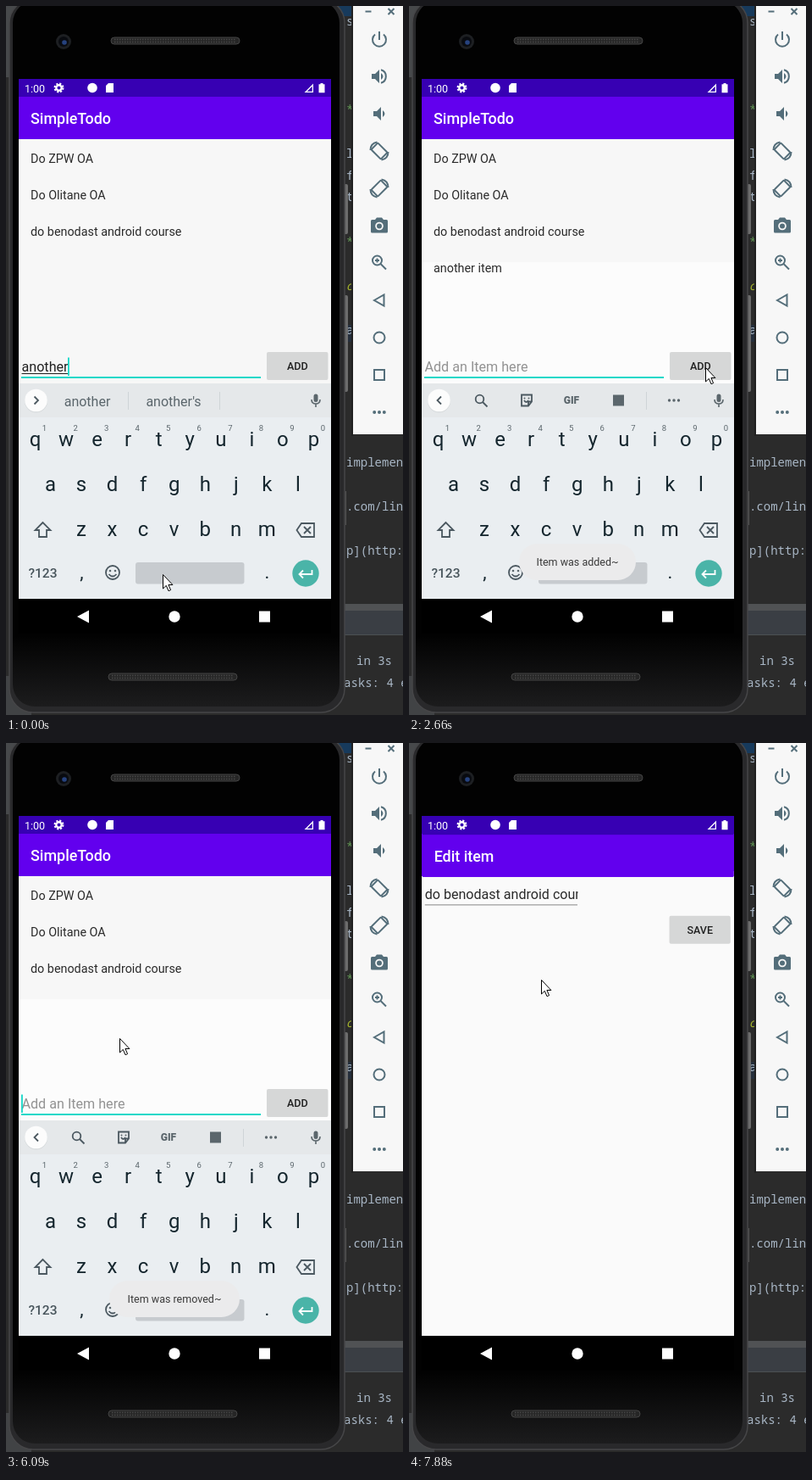
An HTML page for the animation above (8000 ms loop, 469 px wide and 836 px high).

```html
<!DOCTYPE html>
<html lang="en">
<head>
<meta charset="utf-8">
<title>Todo demo</title>
<style>
  html, body { margin: 0; width: 100%; height: 100%; overflow: hidden; background: #2b2b2b; }
  svg { display: block; width: 469px; height: 836px; font-family: Roboto, sans-serif; }
  .mono { font-family: "Noto Sans Mono", monospace; }
  .line { fill: none; stroke: #546e7a; stroke-width: 2; }
  .key { fill: none; stroke: #4b5860; stroke-width: 1.8; }
</style>
</head>
<body>
<script>
const LOOP = 8000;
const SLATE = '#546e7a', GREY = '#5b666c', TEAL = '#14d8c8';

const rect = (x, y, w, h, fill, more = '') => `<rect x="${x}" y="${y}" width="${w}" height="${h}" fill="${fill}" ${more}/>`;
const circle = (x, y, r, fill, more = '') => `<circle cx="${x}" cy="${y}" r="${r}" fill="${fill}" ${more}/>`;
const path = (d, fill, more = '') => `<path d="${d}" fill="${fill}" ${more}/>`;
const text = (x, y, s, size, fill, more = '') => `<text x="${x}" y="${y}" font-size="${size}" fill="${fill}" ${more}>${s}</text>`;
const mid = (x, y, s, size, fill, more = '') => text(x, y, s, size, fill, `text-anchor="middle" ${more}`);
const at = (x, y, body, more = '') => `<g transform="translate(${x} ${y}) ${more}">${body}</g>`;
const group = (id, body, more = '') => `<g id="${id}" ${more}>${body}</g>`;
const stroke = (d, cls = 'line') => `<path class="${cls}" d="${d}"/>`;
const dots = (x, y, gap, r, fill) => [-gap, 0, gap].map(dx => circle(x + dx, y, r, fill)).join('');

function editor() {
  const code = [[402, 23, 's'], [402, 179, 'l'], [402, 205, 'f'], [402, 230, 't'], [402, 387, 'a'],
    [402, 543, 'implemen'], [402, 595, '.com/lin'], [402, 647, 'p](http:'], [414, 777, 'in 3s'], [399, 803, 'asks: 4 e']];
  return rect(0, 0, 469, 836, '#2b2b2b') + rect(0, 0, 30, 84, '#47494b') + rect(0, 790, 30, 46, '#414345') +
    rect(380, 0, 32, 12, '#173a5c') + rect(396, 376, 14, 20, '#252f3c') +
    rect(380, 705, 89, 8, '#505254') + rect(380, 713, 89, 28, '#3a3e44') + rect(380, 741, 89, 1, '#4c5052') +
    `<g class="mono">` + code.map(([x, y, s]) => text(x, y, s, 14, '#a9b7c6')).join('') +
    [127, 283].map(y => text(402, y, '*', 14, '#629755')).join('') +
    text(402, 335, 'o', 14, '#a5b52c', 'font-style="italic"') + '</g>';
}

function speaker(x, y) {
  return rect(x, y, 152, 8, '#262626', 'rx="4" stroke="#454545" stroke-width="1"') +
    [2.5, 5.5].map(dy => `<path d="M${x + 4} ${y + dy}h144" stroke="#484848" stroke-width="1.5" stroke-dasharray="1.5 1.5"/>`).join('');
}

function phone() {
  return rect(399, 210, 5, 59, '#6c6c6c', 'rx="2"') + rect(399, 341, 5, 114, '#6c6c6c', 'rx="2"') +
    rect(401, 572, 1, 40, '#555') +
    rect(4, -8, 396, 841, '#29292b', 'rx="28" stroke="#464648" stroke-width="1.5"') +
    rect(8, -6, 386, 832, 'url(#bezel)', 'rx="26"') +
    speaker(124, 37) + speaker(121, 787) +
    circle(68, 42, 9, '#1d1f22') + circle(68, 42, 6, '#090b10') + circle(69, 43, 2.8, '#26427e') +
    rect(15, 86, 369, 654, '#000') +
    path('M84 720l14-7.5v15z', '#fff') + circle(199, 720, 6.7, '#fff') + rect(299, 713.5, 13, 13, '#fff');
}

function statusIcons() {
  return text(22, 101.5, '1:00', 12.5, '#fff') +
    circle(62.5, 96.5, 3.2, 'none', 'stroke="#fff" stroke-width="2.4"') +
    circle(62.5, 96.5, 5, 'none', 'stroke="#fff" stroke-width="2" stroke-dasharray="2.2 1.73"') +
    circle(102, 96.5, 5.8, '#fff') +
    path('M121 91h6v11h-9v-8z', '#fff') +
    path('M363 91.5v10.5h-10.5zm-1.3 3.2l-6 6h6z', '#fff', 'fill-rule="evenodd"') +
    path('M371.5 91v1.2h-2v10h7v-10h-2v-1.2z', '#fff');
}

const appBar = title => rect(15, 86, 369, 21.5, '#3700b3') + rect(15, 107, 369, 50, '#6200ee') +
  text(29, 139, title, 17.95, '#fff', 'font-weight="500"');

const button = (y, label) => rect(308, y, 72.5, 33, '#d6d7d7', 'rx="2"') +
  mid(344.3, y + 21, label, 12.6, '#222', 'font-weight="500"');

// time, letters after "another ", underline start and width, caret x, suggestions
const typing = [
  [0, '', 18.5, 55, 73, ['another', "another's", '']],
  [150, '', 0, 0, 77, ['day', 'time', 'one']],
  [300, 'i', 77.6, 4, 81, ['I', "I'm", 'is']],
  [450, 'it', 77.6, 9, 86.5, ['it', "it's", 'its']],
  [570, 'ite', 77.6, 17.5, 95, ['item', 'items', 'iter']],
  [690, 'item', 77.6, 31.5, 108.5, ['item', 'item to', 'items']],
];
const ADDED = 2060, REMOVED = 5480;
const LINES = ['Do ZPW OA', 'Do Olitane OA', 'do benodast android course'];

function mainScreen() {
  const field = typing.map(([, s, x, w], i) => group('typed' + i,
    text(77.6, 431, s, 16.14, '#212121') + rect(x, 433, w, 1, '#212121'))).join('');
  return rect(15, 150, 369, 549, '#f7f7f7') + group('lighter', rect(15, 302, 369, 143, '#fcfcfc')) +
    appBar('SimpleTodo') +
    LINES.map((s, i) => text(29, 184.5 + 43 * i, s, 14.35, '#2a2a2a')).join('') +
    group('newItem', text(29, 313.5, 'another item', 14.35, '#2a2a2a')) +
    group('input', text(18.5, 431, 'another', 16.14, '#212121') + field) +
    group('hint', text(18.5, 431, 'Add an Item here', 16.14, '#929292')) +
    rect(18, 437, 283, 2, TEAL) + group('caret', rect(0, 414.5, 1.8, 21.5, TEAL)) + button(408, 'ADD');
}

function keyRow(letters, x, y) {
  return [...letters].map((c, i) => mid(x + 36.55 * i, y, c, 24, '#15262e')).join('');
}

function keyboard() {
  const words = typing.map(([, , , , , list], i) => group('words' + i,
    list.map((s, n) => mid(96 + 102 * n, 471.5, s, 16, GREY)).join(''))).join('');
  const dividers = [144, 252].map(x => rect(x, 455, 1, 21, '#cfd4d7')).join('');
  const tools = stroke('M38 460.5l-4.5 4.5 4.5 4.5', 'key') +
    `<circle class="key" cx="83.5" cy="463.5" r="4.8"/>` + stroke('M87 467l5.5 5.5', 'key') +
    stroke('M133 458.5h12v8l-4 5h-8zM145 466.5h-4v5M136 465q2.5 4 5 0', 'key') +
    circle(136.5, 462.5, 1, GREY) + circle(141.5, 462.5, 1, GREY) +
    mid(192, 469, 'GIF', 12, GREY, 'font-weight="900"') + rect(241, 458.5, 13, 13, GREY) +
    rect(280, 455, 1, 21, '#cfd4d7') + dots(313, 465, 5.5, 1.7, GREY);
  const mic = rect(363.5, 457.5, 5, 9.5, GREY, 'rx="2.5"') +
    `<path d="M361 464q0 5 5 5t5-5M366 469v4" fill="none" stroke="${GREY}" stroke-width="1.6"/>`;
  return rect(15, 445, 369, 254, '#eaeef1') + rect(15, 445, 369, 40, '#e5e8ea') +
    circle(35.5, 466, 13.5, '#d6dadc') + circle(35.5, 465, 13.3, '#fcfcfc') +
    group('suggest', stroke('M33.5 460.5l4.5 4.5-4.5 4.5', 'key') + dividers + words) + group('tools', tools) + mic +
    keyRow('qwertyuiop', 34.5, 519) + keyRow('asdfghjkl', 52.5, 572) + keyRow('zxcvbnm', 89, 625) +
    [...'1234567890'].map((c, i) => mid(45.5 + 36.55 * i, 501, c, 9.5, GREY)).join('') +
    stroke('M43.5 609l-9 9h4.5v8h9v-8h4.5z', 'key') +
    stroke('M349 610h15v16h-15l-5.5-8zM352 614l8 8M360 614l-8 8', 'key') +
    mid(43.5, 674, '?123', 15.5, '#47545b', 'font-weight="500"') + mid(89.5, 674.5, ',', 22, '#15262e') +
    `<circle class="key" cx="126" cy="668" r="8"/>` + circle(123, 666, 1.3, GREY) + circle(129, 666, 1.3, GREY) +
    stroke('M121.5 670q4.5 5 9 0', 'key') +
    rect(153, 656, 128.5, 25.5, '#c7cbcf', 'rx="3"') + mid(308.5, 675, '.', 22, '#15262e') +
    circle(354, 669, 15.7, '#4ab4a8') +
    '<path d="M361.5 665v5h-14M351 665.5l-4.5 4.5 4.5 4.5" fill="none" stroke="#fff" stroke-width="1.8"/>';
}

const toast = (id, x, s) => group(id, rect(x, 634, 398 - 2 * x, 43, '#ebebec', 'rx="21.5"') +
  mid(199, 660, s, 12.5, '#3a3a3a'));

const editScreen = () => rect(15, 150, 369, 590, '#fafafa') + appBar('Edit item') +
  `<g clip-path="url(#entry)">${text(18, 183.5, LINES[2], 16.14, '#2a2a2a')}</g>` +
  rect(18, 189.5, 181, 1, '#858585') + button(203, 'SAVE');

function sidePanel() {
  const speakerIcon = 'M3 9v6h4l5 5V4L7 9z';
  const rotate = '<rect class="line" x="-5.5" y="-8" width="11" height="16" rx="1" transform="rotate(-45)"/>' +
    stroke('M-10.5-1q0-8 8-9.500M10.500 1q0 8-8 9.500');
  return rect(408, 0, 2, 507, '#202020') + rect(410, 0, 59, 505, '#f7f7f7') +
    stroke('M424.5 6.5h7') + stroke('M451.5 3l7 7M458.5 3l-7 7') +
    stroke('M441 30v10M436 33.5a8 8 0 1 0 10 0') +
    at(429, 71, path(speakerIcon, SLATE) + path('M14 8q5 4 0 8z', SLATE) + stroke('M14 4.3a8 8 0 0 1 0 15.4')) +
    at(431, 115, path(speakerIcon, SLATE) + path('M14 8q5 4 0 8z', SLATE)) +
    at(441, 171, rotate) + at(441, 215, rotate, 'scale(-1 1)') +
    path('M438 249.5l-2 2.5h-3.5q-1.5 0-1.5 1.5v12.5q0 1.5 1.5 1.5h17q1.5 0 1.5-1.5v-12.5q0-1.5-1.5-1.5h-3.5l-2-2.5z', SLATE) +
    circle(441, 259.5, 4.8, '#f7f7f7') + circle(441, 259.5, 3, SLATE) +
    '<circle class="line" cx="438.5" cy="300" r="5.5"/>' + stroke('M442.5 304l6.5 6.5M436 300h5M438.5 297.5v5') +
    stroke('M435 347l11.5-6.5v13z') + '<circle class="line" cx="441" cy="391" r="6.5"/>' +
    stroke('M435 429h12v12h-12z') + dots(441, 479, 5.8, 2, SLATE);
}

const pointer = path('M.5.5v16.5l3.8-3.6 2.7 6.3 2.6-1.1-2.7-6.1h5z', '#fff', 'stroke="#000"');

document.body.innerHTML = `<svg viewBox="0 0 469 836">
  <clipPath id="screen"><rect x="15" y="86" width="369" height="613"/></clipPath>
  <clipPath id="entry"><rect x="18" y="160" width="181.5" height="28"/></clipPath>
  <linearGradient id="bezel" x2="0" y2="1">
    <stop offset=".9" stop-color="#020202"/><stop offset="1" stop-color="#1c1c1d"/>
  </linearGradient>` +
  editor() + phone() +
  `<g clip-path="url(#screen)">` + mainScreen() + group('keyboard', keyboard()) +
  toast('addedToast', 130, 'Item was added~') + toast('removedToast', 122, 'Item was removed~') +
  group('edit', editScreen(), 'style="transform-origin:199.5px 413px"') + '</g>' +
  statusIcons() + sidePanel() + group('mouse', pointer) + '</svg>';

// Holds each value until the next time in the table.
function track(id, prop, table, toValue = v => v) {
  const frames = table.map(([t, ...v]) => ({ offset: t / LOOP, [prop]: toValue(...v), easing: 'steps(1, end)' }));
  frames.push({ ...frames.at(-1), offset: 1 });
  document.getElementById(id).animate(frames, { duration: LOOP, iterations: Infinity });
}
const show = (id, from, to = LOOP) => track(id, 'opacity',
  [...(from ? [[0, 0]] : []), [from, 1], ...(to < LOOP ? [[to, 0]] : [])]);
const move = (x, y) => `translate(${x}px, ${y}px)`;

typing.forEach(([t], i) => {
  const end = i + 1 < typing.length ? typing[i + 1][0] : LOOP;
  show('typed' + i, t, end);
  show('words' + i, t, end);
});
show('input', 0, ADDED);
show('suggest', 0, ADDED);
show('hint', ADDED);
show('tools', ADDED);
show('lighter', ADDED);
show('newItem', ADDED + 120, REMOVED);

track('caret', 'transform', [...typing.map(row => [row[0], row[4], 0]), [ADDED, 18, 0]], move);
track('caret', 'opacity', [[0, 1], [1180, 0], [1690, 1], [2060, 0], [2920, 1], [3280, 0], [3680, 1],
  [4340, 0], [4950, 1], [5480, 0], [5970, 1], [6470, 0], [7030, 1], [7520, 0]]);

track('addedToast', 'opacity', [[0, 0], [2180, .5], [2300, 1], [4220, .75], [4340, 0]]);
track('removedToast', 'opacity', [[0, 0], [5480, .5], [5600, 1], [7030, 0]]);

track('keyboard', 'transform', [[0, 0, 0], [7520, 0, 90], [7640, 0, 260]], move);
track('edit', 'opacity', [[0, 0], [7520, .8], [7640, 1]]);
track('edit', 'transform', [[0, .85], [7520, .93], [7640, .978], [7760, .99], [7880, .996]], s => `scale(${s})`);

track('mouse', 'transform', [[0, 185, 670], [1180, 388, 558], [1330, 394, 462], [1450, 375, 438], [1570, 356, 428],
  [1690, 350, 426], [3160, 330, 414], [3280, 262, 400], [3410, 181, 393], [3560, 180, 390], [3680, 178, 387],
  [3830, 147, 344], [3980, 125, 326], [4100, 110, 318], [4220, 108, 318], [5840, 111, 321], [5970, 121, 331],
  [6090, 134, 348], [6210, 142, 371], [6330, 149, 391], [6470, 150, 345], [6600, 149, 297], [6750, 152, 264],
  [7640, 154, 271], [7760, 156, 279]], move);
</script>
</body>
</html>
```
